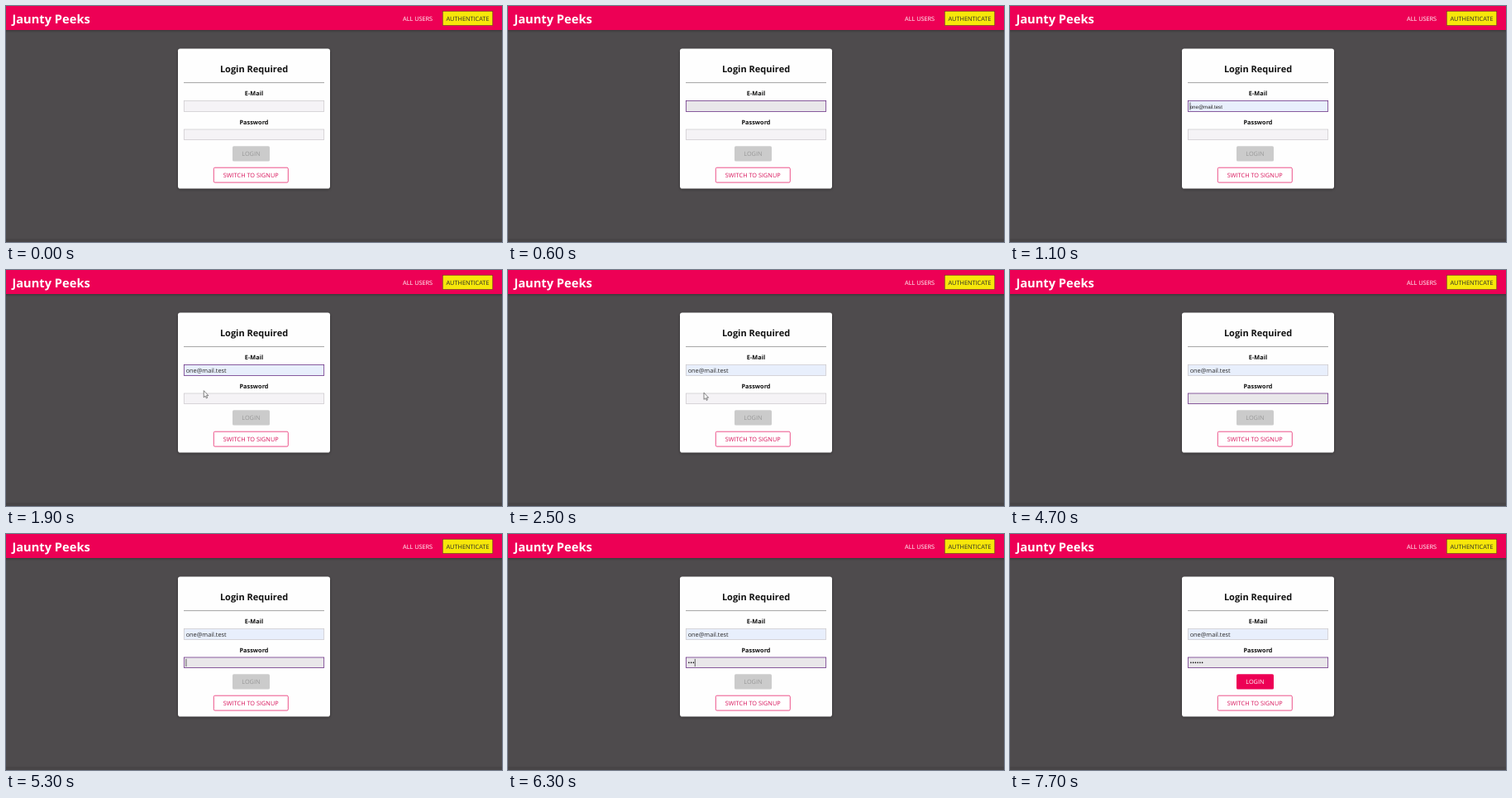
Write an HTML page that moves like this. It is 600 px wide and 285 px high and loops after 8000 ms.

```html
<!DOCTYPE html>
<html lang="en">
<head>
<meta charset="utf-8">
<title>Login form</title>
<style>
  html, body { margin: 0; width: 100%; height: 100%; overflow: hidden; background: #4e4b4d; }
  svg { display: block; width: 600px; height: 285px; }
  text { font: 7.33px "Open Sans", sans-serif; fill: #292929; text-rendering: geometricPrecision; }
  .mid { text-anchor: middle; }
  .bold { font-weight: 700; fill: #111; }
  #brand { font-size: 14.67px; fill: #fff; }
  #title { font-size: 11px; }
  #hint { font: 6.11px "Liberation Sans", Arial, sans-serif; fill: #222; }
</style>
</head>
<body>
<svg viewBox="0 0 600 285">
  <defs>
    <filter id="soft" x="-10%" y="-30%" width="120%" height="160%"><feGaussianBlur stdDeviation="1.8"/></filter>
  </defs>
  <rect width="600" height="285" fill="#4e4b4d"/>
  <rect y="281" width="600" height="4" fill="#484547"/>

  <rect x="-5" y="1" width="610" height="29" opacity=".3" filter="url(#soft)"/>
  <rect width="600" height="29" fill="#ed0055"/>
  <text id="brand" class="bold" x="7.4" y="20.8">Jaunty Peeks</text>
  <text x="480" y="17.6" style="fill:#fff">ALL USERS</text>
  <rect x="528.2" y="6.2" width="60.6" height="17.4" fill="#f7e70a" stroke="#5c3020" stroke-width=".6"/>
  <text class="mid" x="558.5" y="17.6">AUTHENTICATE</text>

  <rect x="208" y="52.5" width="184" height="169" rx="3" opacity=".35" filter="url(#soft)"/>
  <rect x="208" y="51.5" width="184" height="169" rx="2.8" fill="#fefefe"/>
  <text id="title" class="mid bold" x="300" y="80">Login Required</text>
  <path d="M215 92.6H385" stroke="#999" stroke-width=".9"/>
  <text class="mid bold" x="300" y="108.2">E-Mail</text>
  <text class="mid bold" x="300" y="142.8">Password</text>

  <rect id="mail" x="215.3" y="114.5" width="169.4" height="13" stroke-width=".7"/>
  <text id="hint" x="217.7" y="123.5">one@mail.test</text>
  <text id="address" x="217.7" y="123.6">one@mail.test</text>
  <rect id="pass" x="215.3" y="149" width="169.4" height="12.6" stroke-width=".7"/>
  <text id="dots" x="217.6" y="158.2" style="fill:#111"></text>
  <path id="caret" stroke="#222" stroke-width=".7"/>

  <rect id="login" x="274" y="169.3" width="45" height="18.2" rx="1.6"/>
  <text id="loginText" class="mid" x="296.4" y="181">LOGIN</text>
  <rect x="251.3" y="195.2" width="90" height="17.9" rx="1.4" fill="#fff" stroke="#e8266c" stroke-width=".8"/>
  <text class="mid" x="296.2" y="206.9" style="fill:#d8125a">SWITCH TO SIGNUP</text>

  <path id="pointer" d="M0 0V8.2L1.9 6.5L3.1 9.2L4.4 8.6L3.2 6H5.6Z" fill="#fff" stroke="#333" stroke-width=".6"/>
</svg>
<script>
  const LOOP = 8000;
  const FILL = 1400, BLUR = 2500, FOCUS = 3100;
  const KEYS = [6000, 6100, 6300, 6600, 7000, 7200];
  // Times at which the caret toggles, starting visible
  const BLINKS = [100, 600, 1000, 1900, 2400, BLUR, FOCUS, 3700, 4200, 4700, 5200, 5700, 6000, 7700];
  const DOT = 2.78;
  const $ = id => document.getElementById(id);
  const show = (id, on) => $(id).setAttribute("visibility", on ? "visible" : "hidden");
  const within = (t, a, b) => t >= a && t < b;

  function field(id, focused, filled) {
    const box = $(id);
    box.setAttribute("fill", filled ? "#e8effc" : focused ? "#e9e7ea" : "#f5f3f6");
    box.setAttribute("stroke", focused ? "#5b1a78" : "#c9c6ca");
  }

  function draw(t) {
    const inMail = within(t, 100, BLUR);
    const inPass = t >= FOCUS;
    const count = KEYS.filter(k => t >= k).length;
    const ready = count === KEYS.length;

    field("mail", inMail, t >= 1000);
    field("pass", inPass, false);
    show("hint", within(t, 1000, FILL));
    show("address", t >= FILL);
    $("dots").textContent = "•".repeat(count);

    const x = inPass ? 217.9 + count * DOT : t >= FILL ? 267 : 217.9;
    const y = inPass ? 150.9 : 116.4;
    $("caret").setAttribute("d", `M${x} ${y}v9.2`);
    show("caret", (inMail || inPass) && BLINKS.filter(b => t >= b).length % 2 === 1);

    $("login").setAttribute("fill", ready ? "#ed0055" : "#cbcbcb");
    $("loginText").style.fill = ready ? "#fff" : "#989898";

    const step = Math.floor(t / 100) * 100;
    const p = Math.min(1, Math.max(0, (step - 1600) / 600));
    const glide = p * (2 - p);
    $("pointer").setAttribute("transform", `translate(${246 - 9 * glide} ${138 + 10.2 * glide})`);
    show("pointer", within(t, 1700, FOCUS));
  }

  const start = performance.now();
  function tick() {
    draw((performance.now() - start) % LOOP);
    requestAnimationFrame(tick);
  }
  tick();
</script>
</body>
</html>
```
